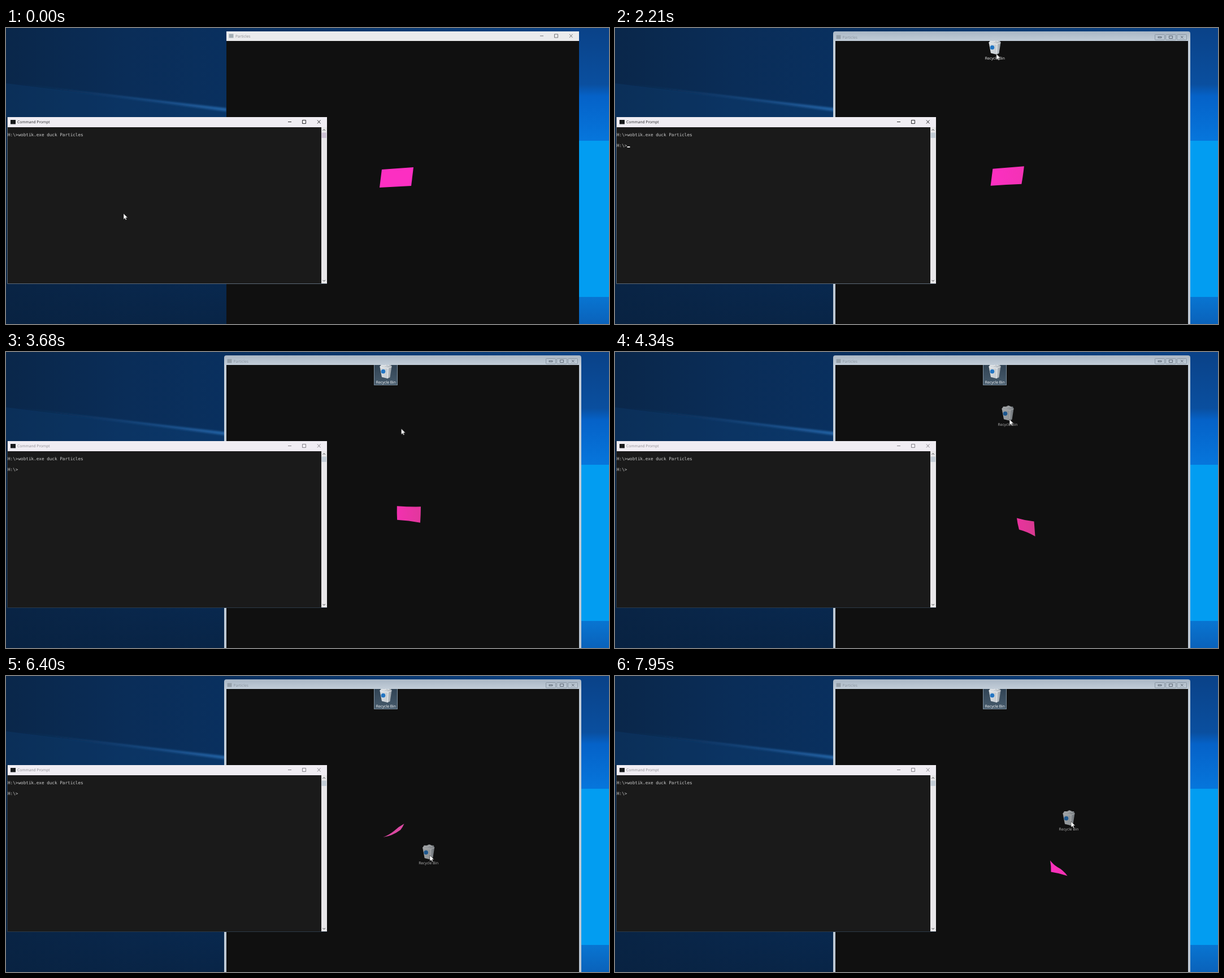
Animation of 1067x525 px, one loop 8000 ms. Source, as an HTML page:

```html
<!DOCTYPE html>
<html lang="en">
<head>
<meta charset="utf-8">
<title>Desktop</title>
<style>
html, body { margin: 0; width: 100%; height: 100%; overflow: hidden; background: #0a2446; }
svg { display: block; width: 1067px; height: 525px; }
text { font: 6.7px "Open Sans", "Noto Sans", sans-serif; text-rendering: geometricPrecision; }
.mono { font: 7.67px "DejaVu Sans Mono", monospace; fill: #ccc; white-space: pre; }
.label { fill: #fff; text-anchor: middle; }
.line { fill: none; stroke-width: 1; }

.before, .after, .active, .idle, .caret, .drag, .move, .lag, .cloth, .tintA, .tintB {
  animation: 8s linear infinite;
}
.before { animation-name: hideOnRun; animation-timing-function: step-end; }
.after { animation-name: showOnRun; animation-timing-function: step-end; }
.active { animation-name: hideOnClick; animation-timing-function: step-end; }
.idle { animation-name: showOnClick; animation-timing-function: step-end; }
.caret { animation-name: blink; animation-timing-function: step-end; }
.drag { animation-name: showOnDrag; animation-timing-function: step-end; }
.move { animation-name: move; }
.lag { animation-name: lag; }
.cloth { animation-name: cloth; }
.tintA { animation-name: tintA; }
.tintB { animation-name: tintB; }

@keyframes hideOnRun { 0% { visibility: visible } 11.5%, 100% { visibility: hidden } }
@keyframes showOnRun { 0% { visibility: hidden } 11.5%, 100% { visibility: visible } }
@keyframes hideOnClick { 0% { visibility: visible } 29.5%, 100% { visibility: hidden } }
@keyframes showOnClick { 0% { visibility: hidden } 29.5%, 100% { visibility: visible } }
@keyframes showOnDrag { 0% { visibility: hidden } 51.6%, 100% { visibility: visible } }
@keyframes blink {
  0% { visibility: hidden }
  11.5% { visibility: visible }
  18.5% { visibility: hidden }
  25% { visibility: visible }
  29.5%, 100% { visibility: hidden }
}
@keyframes move {
  0%, 18.5% { transform: translate(208px, 329px); animation-timing-function: ease-in-out }
  28%, 30% { transform: translate(676px, 45px); animation-timing-function: ease-in-out }
  37.125%, 41% { transform: translate(759px, 363px); animation-timing-function: ease-in-out }
  49%, 51.5% { transform: translate(675px, 43px); animation-timing-function: ease-in }
  54.25% { transform: translate(698px, 119px) }
  60% { transform: translate(702px, 240px); animation-timing-function: ease-out }
  66.875% { transform: translate(690px, 320px); animation-timing-function: ease-in-out }
  80% { transform: translate(750px, 318px); animation-timing-function: ease-in-out }
  99.375%, 100% { transform: translate(807px, 258px) }
}
@keyframes lag {
  0%, 54.25% { transform: translate(-3px, 8.5px) }
  66.875% { transform: translate(-2.5px, 11px) }
  80% { transform: translate(-2.3px, 13.5px) }
  99.375%, 100% { transform: translate(-4px, 13px) }
}
@keyframes cloth {
  0%, 11.5% { d: path("M665 251Q693 249 721 247Q719 264 717 280Q689 281.500 661 283Q663 267 665 251Z") }
  16.5% { d: path("M666.500 250.500Q694 248 722 246Q720 262 717.500 279Q690 280 663 282Q665 266 666.500 250.500Z") }
  37.125% { d: path("M670 249Q697 247 725.500 244.500Q724 260 721 275Q694 276 666 278Q668 263 670 249Z"); animation-timing-function: ease-in-out }
  54.25% { d: path("M711 294.500Q726 299 741.500 300.500Q742.500 314 743.500 327Q729 318.500 715 315Q712 304 711 294.500Z") }
  66.875% { d: path("M725 257Q729 265 735 267.500Q738 276 737 284Q735 289 733 292Q727 284 723 273.500Q727 266 725 257Z") }
  80% { d: path("M667 286Q678 282 687 274.500Q695 267 704.500 262Q702 268 698 273Q683 284 667 286Z") }
  99.375%, 100% { d: path("M770 327Q775 334 783 339Q793 344 800.500 354.500Q786 349.500 771.500 347.500Q772 337 770 327Z") }
}
@keyframes tintA {
  0%, 37.125% { stop-color: #fc2fc2 }
  54.25% { stop-color: #ea329f }
  66.875% { stop-color: #f92fbb }
  80% { stop-color: #d8479f }
  99.375%, 100% { stop-color: #fb30bd }
}
@keyframes tintB {
  0%, 16.5% { stop-color: #fc2fc2 }
  37.125% { stop-color: #ec35aa }
  54.25% { stop-color: #d83a90 }
  66.875% { stop-color: #f92fbb }
  80% { stop-color: #dc4aa4 }
  99.375%, 100% { stop-color: #f433b2 }
}
</style>
</head>
<body>
<svg viewBox="0 0 1067 525">
  <defs>
    <linearGradient id="sky">
      <stop offset="0" stop-color="#0a274a"/>
      <stop offset=".2" stop-color="#0a2d58"/>
      <stop offset=".37" stop-color="#09305f"/>
      <stop offset="1" stop-color="#0a4488"/>
    </linearGradient>
    <linearGradient id="east" x2="0" y2="1">
      <stop offset="0" stop-color="#0a4288"/>
      <stop offset=".19" stop-color="#0a4f9f"/>
      <stop offset=".23" stop-color="#0562c8"/>
      <stop offset=".38" stop-color="#0676dc"/>
      <stop offset=".9" stop-color="#0877d4"/>
      <stop offset="1" stop-color="#0a62ba"/>
    </linearGradient>
    <linearGradient id="beam" gradientUnits="userSpaceOnUse" x1="0" x2="390" y1="0" y2="0">
      <stop offset="0" stop-color="#1d5a9c" stop-opacity=".1"/>
      <stop offset="1" stop-color="#2f7cc8" stop-opacity=".65"/>
    </linearGradient>
    <linearGradient id="floor" x2="0" y2="1">
      <stop offset="0" stop-color="#08213f" stop-opacity="0"/>
      <stop offset="1" stop-color="#08213f" stop-opacity=".75"/>
    </linearGradient>
    <linearGradient id="glass" x2="0" y2="1">
      <stop offset="0" stop-color="#aab7c5"/>
      <stop offset=".035" stop-color="#c3ced9"/>
      <stop offset="1" stop-color="#bdc8d4"/>
    </linearGradient>
    <linearGradient id="pick" x2="0" y2="1">
      <stop offset="0" stop-color="#2f4152"/>
      <stop offset="1" stop-color="#475b6c"/>
    </linearGradient>
    <linearGradient id="pink">
      <stop class="tintA" offset="0" stop-color="#fc2fc2"/>
      <stop class="tintB" offset="1" stop-color="#fc2fc2"/>
    </linearGradient>
    <linearGradient id="pail">
      <stop offset="0" stop-color="#d9dee2"/>
      <stop offset=".6" stop-color="#c6ccd1"/>
      <stop offset="1" stop-color="#969ea5"/>
    </linearGradient>
    <filter id="soft" x="-10%" y="-60%" width="120%" height="220%"><feGaussianBlur stdDeviation="1.600"/></filter>
    <clipPath id="client"><path d="M390 23H1014V525H390Z"/></clipPath>

    <g id="bin">
      <path d="M-10.500-27L-8-31L-3-31L1-33L6-31L9-31L10.500-27L7.500-8L3-6L-7-8.500Z" fill="url(#pail)"/>
      <path class="line" d="M-10.500-27L-4-25L4-24.500L10.500-27M4-24.500L3-6M-7-30L-3-28L2-31L7-28" stroke="#f0f2f4" stroke-width=".7"/>
      <circle cx="-4.500" cy="-18.500" r="3.800" fill="#2376c4"/>
    </g>
    <g id="controls" class="line">
      <path d="M0 .5H6M25.500-2.500H31.500V3.500H25.500ZM52-2.500L57.500 3.500M57.500-2.500L52 3.500"/>
    </g>
  </defs>

  <!-- wallpaper -->
  <rect width="1067" height="525" fill="url(#sky)"/>
  <path d="M0 98L390 148V158H0Z" fill="#12508f" opacity=".2"/>
  <path d="M0 97L390 142V148Z" fill="url(#beam)" filter="url(#soft)"/>
  <rect y="300" width="390" height="225" fill="url(#floor)"/>
  <rect x="1000" width="67" height="525" fill="url(#east)"/>
  <rect x="790" y="200" width="277" height="277" fill="#029df1"/>

  <!-- particle window -->
  <g class="before">
    <rect x="390" y="6" width="624" height="17" fill="#ebebed"/>
    <rect x="394.500" y="10.500" width="8" height="7" fill="#a3adb4"/>
    <text x="406" y="17" fill="#8b8b8f">Particles</text>
    <use href="#controls" x="945" y="13.500" stroke="#77777b"/>
  </g>
  <g class="after">
    <path d="M386 525V10Q386 6 390 6H1014Q1018 6 1018 10V525Z" fill="url(#glass)"/>
    <rect x="391.500" y="12.500" width="8" height="7" fill="#95a0aa"/>
    <text x="402.500" y="18.700" fill="#87929d">Particles</text>
    <g class="line" stroke="#8996a3">
      <rect x="955.500" y="11.500" width="17" height="9.500" rx="1"/>
      <rect x="974.500" y="11.500" width="18" height="9.500" rx="1"/>
      <rect x="994.500" y="11.500" width="17" height="9.500" rx="1"/>
      <path d="M961 15.500H967V17.500H961ZM980.500 14H986.500V18.500H980.500ZM1001 14L1005.500 18.500M1005.500 14L1001 18.500" stroke="#5e6975"/>
    </g>
  </g>
  <rect x="390" y="23" width="624" height="502" fill="#101010"/>
  <path class="cloth" d="M665 251Q693 249 721 247Q719 264 717 280Q689 281.500 661 283Q663 267 665 251Z" fill="url(#pink)"/>

  <!-- desktop icon -->
  <g clip-path="url(#client)">
    <g class="idle">
      <rect x="651.500" y="19.500" width="41" height="39" fill="url(#pick)" stroke="#7f909e"/>
    </g>
    <g class="after">
      <use href="#bin" x="672" y="53"/>
      <text class="label" x="672.300" y="55.800">Recycle Bin</text>
    </g>
  </g>

  <!-- console -->
  <rect x="3" y="158" width="565" height="295" fill="#1a1a1a"/>
  <path class="line active" d="M2.500 158V453.500H568" stroke="#5d6a78"/>
  <path class="line idle" d="M2.500 158V453.500H568" stroke="#2c3947"/>
  <rect x="3" y="158" width="565" height="18" fill="#f0edf3"/>
  <rect x="8" y="163" width="9" height="7.500" fill="#17191b"/>
  <g class="active">
    <text x="20" y="169.300" fill="#1c1c1f">Command Prompt</text>
    <use href="#controls" x="499" y="166" stroke="#2a2a2d"/>
  </g>
  <g class="idle">
    <text x="20" y="169.300" fill="#8c8a90">Command Prompt</text>
    <use href="#controls" x="499" y="166" stroke="#858389"/>
  </g>
  <rect x="558" y="176" width="10" height="277" fill="#e9e8ea"/>
  <rect class="before" x="558.500" y="185.500" width="8.500" height="9.500" fill="#cdc2d4"/>
  <rect class="after" x="558.500" y="185.500" width="8.500" height="9.500" fill="#c3ccd5"/>
  <path class="line" d="M560.500 182L562.700 179.800L565 182M560.500 447L562.700 449.200L565 447" stroke="#444"/>
  <text class="mono" x="3" y="192">H:\&gt;wobtik.exe duck Particles</text>
  <text class="mono after" x="3" y="211">H:\&gt;</text>
  <rect class="caret" x="21.500" y="210" width="5" height="2" fill="#e8e8e8"/>

  <!-- pointer and dragged icon -->
  <g class="move">
    <g class="drag">
      <g class="lag" opacity=".7">
        <use href="#bin"/>
        <text class="label" y="2.800">Recycle Bin</text>
      </g>
    </g>
    <path d="M0 0V10.500L2.300 8.300L3.800 11.500L5.500 10.700L4 7.600H7.300Z" fill="#fff" stroke="#111" stroke-width=".5"/>
  </g>
</svg>
</body>
</html>
```
